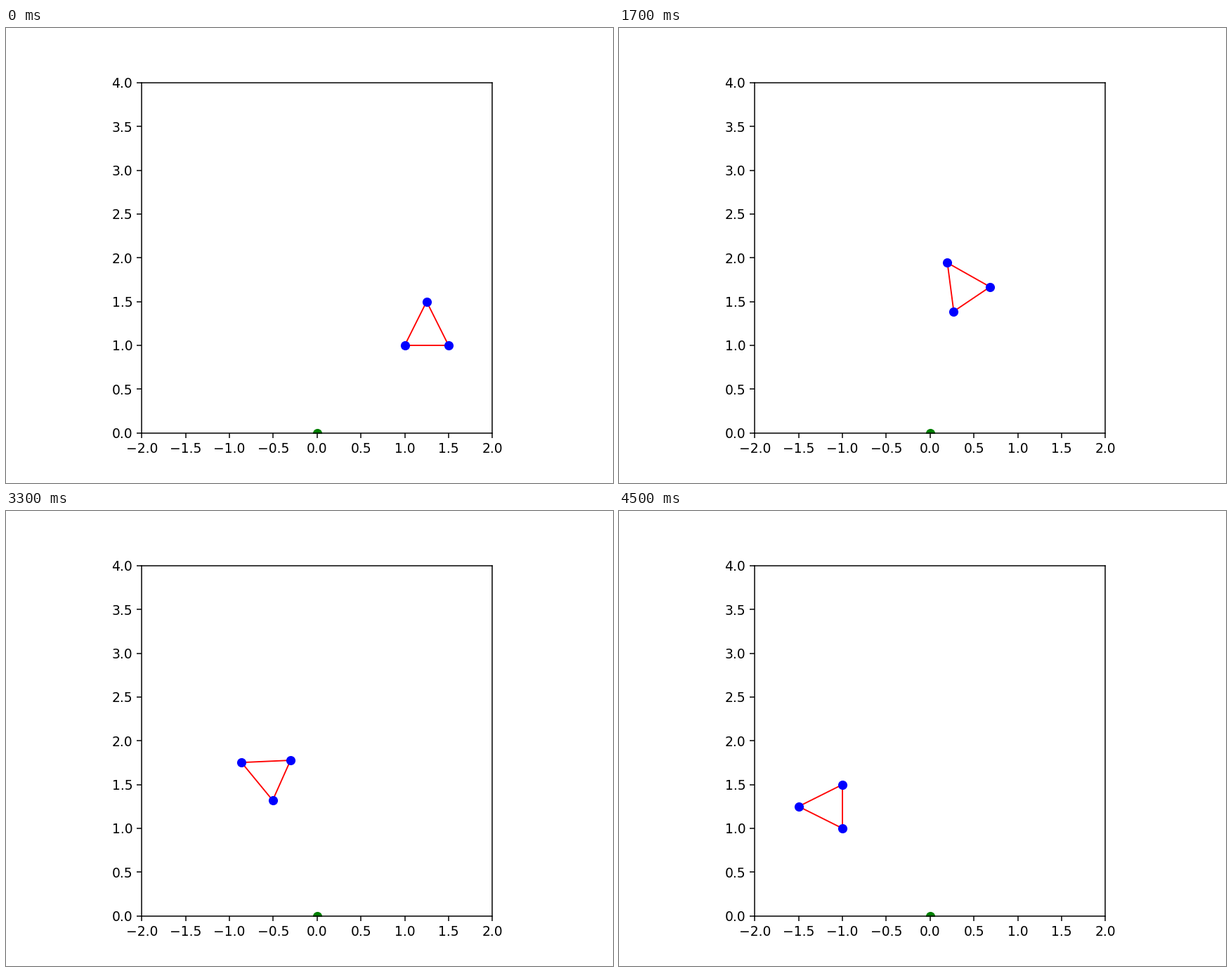
Write a matplotlib script that moves like this. It is 864 px wide and 648 px high and loops after 4.55 s.

```python
import numpy as np
import matplotlib.pyplot as plt
from matplotlib.animation import FuncAnimation
from matplotlib.patches import Polygon

FRAMES = 91  # one degree per frame, 0 to 90
CORNERS = np.array([[1, 1], [1.5, 1], [1.25, 1.5]])


def rotated(points, degrees):
    a = np.radians(degrees)
    c, s = np.cos(a), np.sin(a)
    return points @ np.array([[c, s], [-s, c]])


fig, ax = plt.subplots(figsize=(6.4, 4.8), dpi=135)
ax.set_xlim(-2, 2)
ax.set_ylim(0, 4)
ax.set_aspect("equal")

ax.plot(0, 0, "go")  # centre of rotation
triangle = ax.add_patch(Polygon(CORNERS, fill=False, edgecolor="red", linewidth=1))
dots, = ax.plot(*CORNERS.T, "bo")


def update(frame):
    points = rotated(CORNERS, frame)
    triangle.set_xy(points)
    dots.set_data(*points.T)
    return triangle, dots


anim = FuncAnimation(fig, update, frames=FRAMES, interval=50, repeat=True)
plt.show()
```
